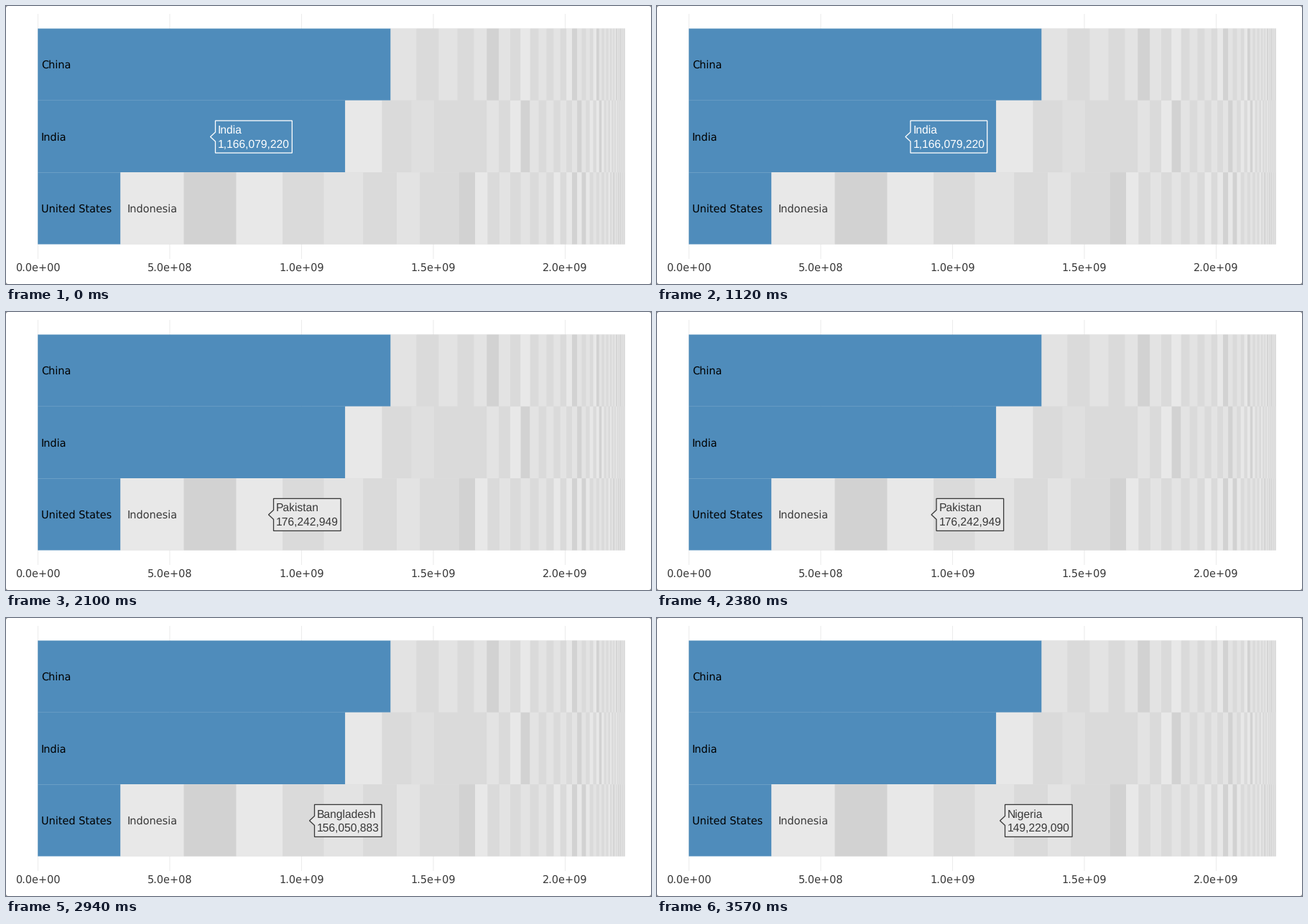
These frames come from a looping animation (898x388 px, 3.64 s). A matplotlib script:

```python
import random

import matplotlib.pyplot as plt
import numpy as np
from matplotlib.animation import FuncAnimation
from matplotlib.patches import FancyBboxPatch

W, H, DPI = 898, 388, 100
FRAMES, INTERVAL = 52, 70
PT = 72 / DPI                        # points per pixel
X0, X1, PX_PER_M = 44.3, 862, 0.367  # plot edges, pixels per million people
TOP, ROW_H = 31.5, 100.35
BLUE, DARK, LIGHT = "#4f8cbb", "#383838", "#e8e8e8"

# population in millions at key ranks; the rest is interpolated
KEY_RANKS = [*range(13), 15, 18, 22, 23, 33, 38, 57, 72, 200]
KEY_PEOPLE = [1338.6, 1166.1, 313.8, 240.3, 198.7, 176.2, 156, 149.2, 140,
              127.1, 111.2, 98, 88.6, 82.3, 66.4, 58.1, 49, 38.5, 32.4,
              18.9, 11.4, 0.25]

# greys of the widest cells in each row; later cells alternate
SHADES = {"l": LIGHT, "e": "#e3e3e3", "f": "#dfdfdf",
          "a": "#dadada", "d": "#d2d2d2"}
ROW_SHADES = ["eaeaed", "lafaaa", "ldlaeaeaad"]

# pointer path: (frame, x)
PATH = [(0, 284), (6, 284), (9, 320), (14, 339), (19, 355), (24, 360),
        (29, 360), (32, 375), (33, 376), (41, 420), (43, 424), (51, 477)]
LEAVE, ENTER = 21, 24                # frames without a tooltip between rows

plt.rcParams["text.hinting"] = "none"
fig = plt.figure(figsize=(W / DPI, H / DPI), dpi=DPI, facecolor="#8c8c8c")
ax = fig.add_axes([0, 0, 1, 1])
ax.set_xlim(0, W)
ax.set_ylim(H, 0)
ax.axis("off")
ax.add_patch(FancyBboxPatch((0, 0), W, H, facecolor="white", linewidth=0,
                            boxstyle="round,pad=0,rounding_size=3", zorder=0))


def label(x, y, text, color="black", size=14.55, font="DejaVu Sans", **kw):
    return ax.text(x, y, text, color=color, fontsize=size * PT, family=font,
                   va="baseline", **kw)


def draw_axis():
    for i in range(5):
        x = 44.5 + i * 183.5
        ax.vlines(x, 11, 353, color="#ebebeb", lw=PT, zorder=0.5, snap=False)
        label(x, 370, f"{i * 5e8:.1e}", color=DARK, ha="center")


def pack_rows():
    """Put each country at the end of the shortest row."""
    rng = random.Random(4)
    ranks = np.arange(KEY_RANKS[-1] + 1)
    people = np.exp(np.interp(ranks, KEY_RANKS, np.log(KEY_PEOPLE)))
    ends = [X0] * 3
    rows = [[], [], []]
    for rank, width in zip(ranks, people * PX_PER_M):
        r = int(np.argmin(ends))
        n = len(rows[r]) - 1
        if rank < 3:
            color = BLUE
        elif n < len(ROW_SHADES[r]):
            color = SHADES[ROW_SHADES[r][n]]
        else:
            color = SHADES[rng.choice("aad" if n % 2 else "lee")]
        width = max(0, min(width, X1 - ends[r]))
        rows[r].append((ends[r], width, color))
        ends[r] += width
    return rows


def draw_bars():
    for r, cells in enumerate(pack_rows()):
        span = (TOP + r * ROW_H, ROW_H)
        bar = dict(linewidths=0, snap=False)
        grey_start = cells[0][0] + cells[0][1]
        ax.broken_barh([(grey_start, X1 - grey_start)], span,
                       facecolors="#dedede", **bar)
        ax.broken_barh([c[:2] for c in cells], span,
                       facecolors=[c[2] for c in cells], **bar)


draw_axis()
draw_bars()
for row, country in enumerate(("China", "India", "United States")):
    label(48.7, 87.2 + row * ROW_H, country)
label(169, 87.2 + 2 * ROW_H, "Indonesia", color=DARK)

box, = ax.fill([0], [0], lw=1.3 * PT, joinstyle="miter", zorder=5)
lines = [label(0, 0, "", size=15.6, font="Liberation Sans", zorder=6)
         for _ in range(2)]


def hovered(frame, x):
    """Row, name and value of the cell under the pointer."""
    if frame < ENTER:
        return 1, "India", "1,166,079,220"
    if x < 385.5:
        return 2, "Pakistan", "176,242,949"
    if x < 442.8:
        return 2, "Bangladesh", "156,050,883"
    return 2, "Nigeria", "149,229,090"


def update(frame):
    x = np.interp(frame, *zip(*PATH))
    row, name, value = hovered(frame, x)
    ink = "white" if row == 1 else DARK

    cy = 82.2 + row * ROW_H
    tip, left = x + 0.5, x + 7.5
    right = left + (106.8 if row == 1 else 93.6)
    top, bottom = cy - 22.5, cy + 22.5
    box.set_xy([(tip, cy), (left, cy - 6.5), (left, top), (right, top),
                (right, bottom), (left, bottom), (left, cy + 6.5)])
    box.set_facecolor(BLUE if row == 1 else LIGHT)
    box.set_edgecolor(ink)
    for line, text, dy in zip(lines, (name, value), (-4.6, 15.4)):
        line.set_text(text)
        line.set_position((x + 11, cy + dy))
        line.set_color(ink)
    for artist in (box, *lines):
        artist.set_visible(not LEAVE <= frame < ENTER)
    return (box, *lines)


anim = FuncAnimation(fig, update, frames=FRAMES, interval=INTERVAL,
                     repeat=True, repeat_delay=0, blit=False)
plt.show()
```
